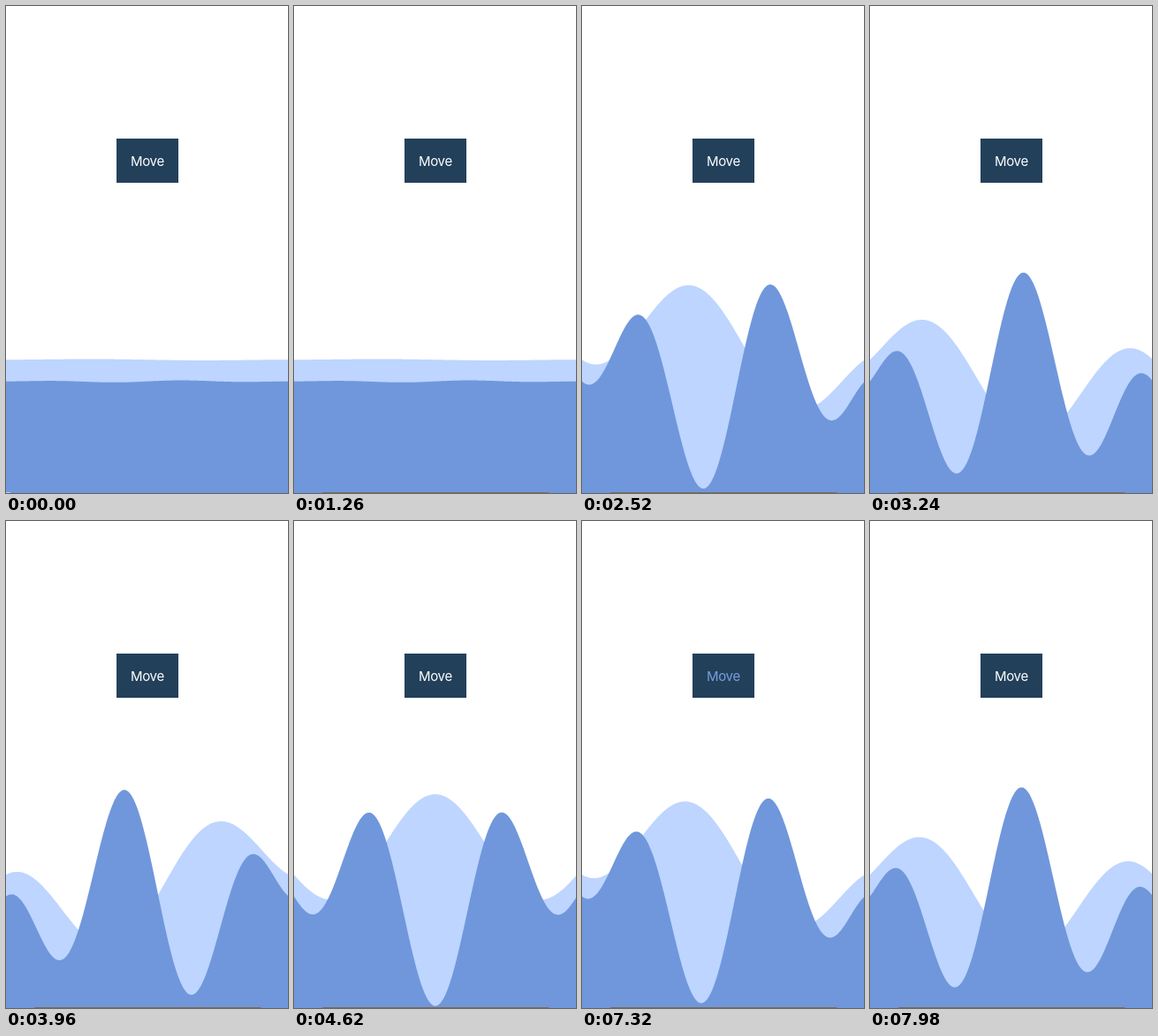
Recreate the animation shown at these times as an HTML page. Size 319 by 551 pixels, loop 8 s.

```html
<!DOCTYPE html>
<html lang="en">
<head>
<meta charset="utf-8">
<title>Waves</title>
<style>
  html, body { margin: 0; width: 100%; height: 100%; overflow: hidden; background: #fff; }
  svg { display: block; width: 319px; height: 551px; }
  text { font: 400 15px Inter, Roboto, sans-serif; letter-spacing: -0.3px; }
</style>
</head>
<body>
<svg viewBox="0 0 319 551">
  <path id="back" fill="#bdd5ff"/>
  <path id="front" fill="#7097db"/>
  <rect id="corner" y="550" width="5" height="1" fill="#bdd5ff"/>
  <rect id="bar" x="32" y="550" width="256" height="1" fill="#7a7068"/>
  <rect x="125" y="150" width="70" height="50" fill="#23405a"/>
  <text id="label" x="140.9" y="181">Move</text>
</svg>
<script>
  const LOOP = 8000, STEP = 60, WIDTH = 320, IDLE = 0.01;
  const $ = id => document.getElementById(id);

  const waves = [
    { el: $('back'), base: 400.2, amp: 91, cycles: 1 },
    { el: $('front'), base: 424.7, amp: 124, cycles: 2 },
  ];

  // [ms, turns of phase]
  const phases = [
    [0, 0], [1440, 0], [2520, 1.1], [3960, 2.578], [5280, 3.92],
    [7110, 3.92], [7320, 4.085], [7980, 4.825],
  ];

  const presses = [{ down: 1320, up: 1500 }, { down: 6960, up: 7140 }];

  // [ms since release, rgb]
  const fade = [
    [0, [74, 104, 148]], [180, [122, 157, 224]],
    [300, [189, 213, 255]], [420, [255, 255, 255]],
  ];

  const mix = (a, b, k) =>
    Array.isArray(a) ? a.map((v, i) => mix(v, b[i], k)) : a + (b - a) * k;

  function sample(table, t) {
    const i = table.findIndex(([at]) => at > t);
    if (i < 0) return table[table.length - 1][1];
    if (i === 0) return table[0][1];
    const [t0, a] = table[i - 1], [t1, b] = table[i];
    return mix(a, b, (t - t0) / (t1 - t0));
  }

  // Sine under a parabolic envelope that pins both edges
  function wavePath({ base, amp, cycles }, level, phase) {
    let d = 'M0 551';
    for (let x = 0; x <= WIDTH; x++) {
      const u = x / WIDTH;
      const envelope = 1 - (2 * u - 1) ** 2;
      const y = base - amp * level * envelope * Math.sin(2 * Math.PI * (u * cycles - phase));
      d += `L${x} ${y.toFixed(2)}`;
    }
    return d + `L${WIDTH} 551Z`;
  }

  function labelColor(t) {
    const press = presses.filter(p => t >= p.down).pop();
    const rgb = press ? sample(fade, t - press.up) : [255, 255, 255];
    return `rgb(${rgb.map(Math.round)})`;
  }

  function draw(t) {
    const moving = (t >= 1500 && t < 5280) || t >= 7140;
    const phase = sample(phases, t);
    for (const w of waves) w.el.setAttribute('d', wavePath(w, moving ? 1 : IDLE, phase));
    $('bar').style.display = t >= 1260 ? '' : 'none';
    $('corner').style.display = t < 1260 ? '' : 'none';
    $('label').setAttribute('fill', labelColor(t));
  }

  const start = performance.now();
  function tick() {
    const t = (performance.now() - start) % LOOP;
    draw(Math.floor(t / STEP) * STEP);
    requestAnimationFrame(tick);
  }
  tick();
</script>
</body>
</html>
```
